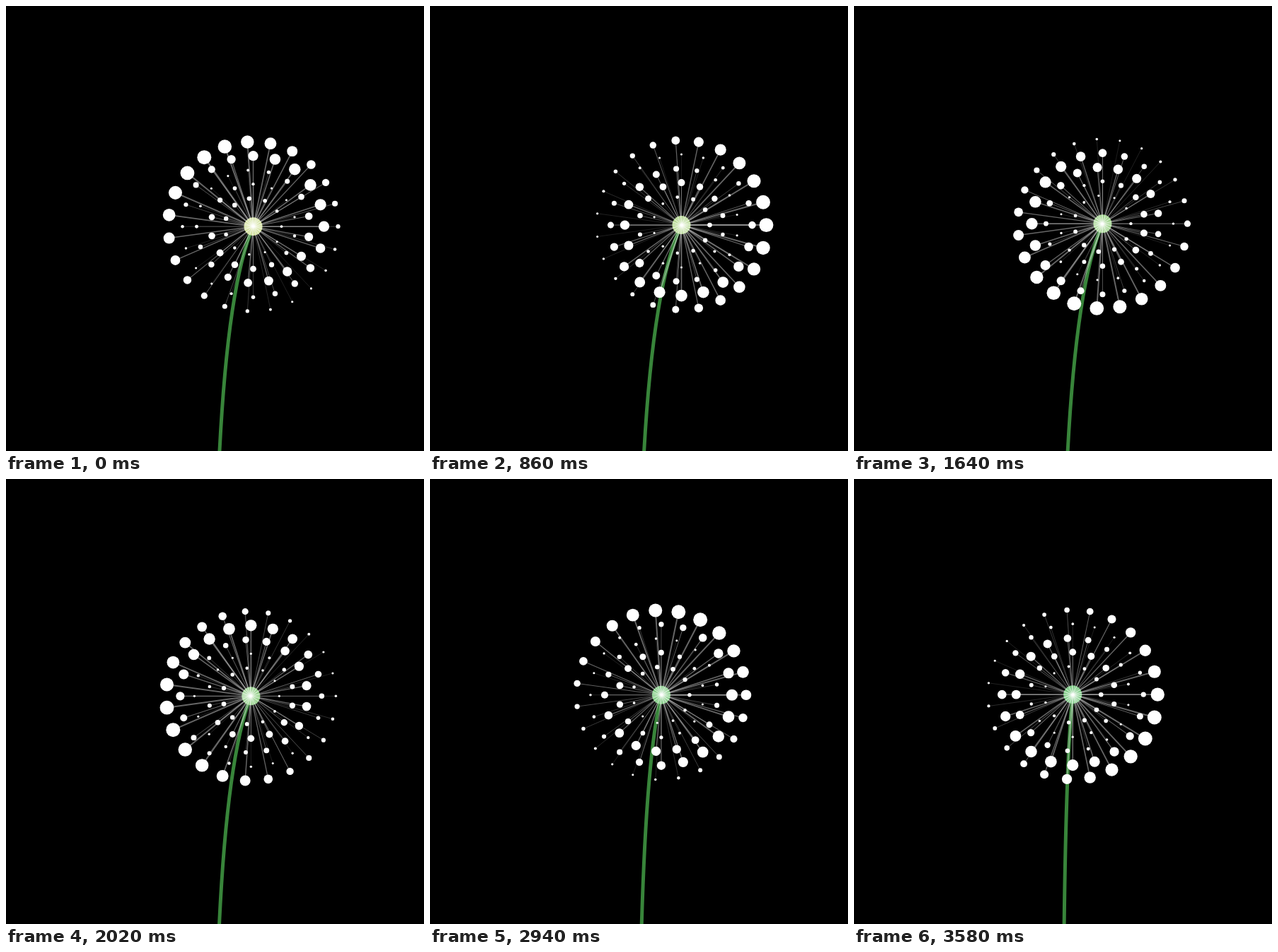
An HTML page with a canvas that plays this animation: 591 by 630 pixels, repeating every 3.6 s.

```html
<!DOCTYPE html>
<html>
<head>
<meta charset="utf-8">
<title>Dandelion</title>
<style>
  html, body { margin: 0; height: 100%; overflow: hidden; background: #000; }
  canvas { display: block; }
</style>
</head>
<body>
<canvas id="stage" width="591" height="630"></canvas>
<script>
const ctx = document.getElementById("stage").getContext("2d");
const W = 591, H = 630, MID = W / 2;
const LOOP = 3600, STEP = 20, FIRST_TICK = 112;
const RINGS = 5;

function disc(x, y, r, color) {
  ctx.fillStyle = color;
  ctx.beginPath();
  ctx.arc(x, y, r, 0, Math.PI * 2);
  ctx.fill();
}

function drawStem(x, y) {
  ctx.strokeStyle = "#38853a";
  ctx.lineWidth = 5;
  ctx.beginPath();
  ctx.moveTo(MID, 925);
  ctx.quadraticCurveTo(MID, 435, x, y);
  ctx.stroke();
}

// Each ring starts a quarter turn after the previous one; a wave of dot sizes runs around it.
function drawRing(ring, x, y, phase) {
  const radius = 40 + 20 * ring;
  const count = 11 + 3 * ring;
  const turn = ring * Math.PI / 2;
  const minSize = 1.5, maxSize = radius / 12;
  for (let i = 0; i < count; i++) {
    const angle = turn + i / count * Math.PI * 2;
    const wave = (1 + Math.sin(phase - angle - turn)) / 2;
    const size = minSize + (maxSize - minSize) * wave;
    const px = x + radius * Math.cos(angle);
    const py = y + radius * Math.sin(angle);
    ctx.strokeStyle = "rgba(255,255,255,.4)";
    ctx.lineWidth = size / 5;
    ctx.beginPath();
    ctx.moveTo(x, y);
    ctx.lineTo(px, py);
    ctx.stroke();
    disc(px, py, size, "#fff");
  }
}

function draw(time) {
  const tick = FIRST_TICK + Math.floor(time % LOOP / STEP);
  const sway = tick * 0.01;
  const x = MID + 60 * Math.sin(sway);
  const y = 310 + 5 * Math.cos(sway);
  const warmth = (1 + Math.cos(sway)) / 2;

  ctx.fillStyle = "#000";
  ctx.fillRect(0, 0, W, H);
  drawStem(x, y);
  disc(x, y, 13, `rgb(${105 + 140 * warmth},${195 + 38 * warmth},${115 + 45 * warmth})`);
  for (let ring = 0; ring < RINGS; ring++) drawRing(ring, x, y, tick * 0.05);
}

const start = performance.now();
function loop() {
  draw(performance.now() - start);
  requestAnimationFrame(loop);
}
loop();
</script>
</body>
</html>
```
